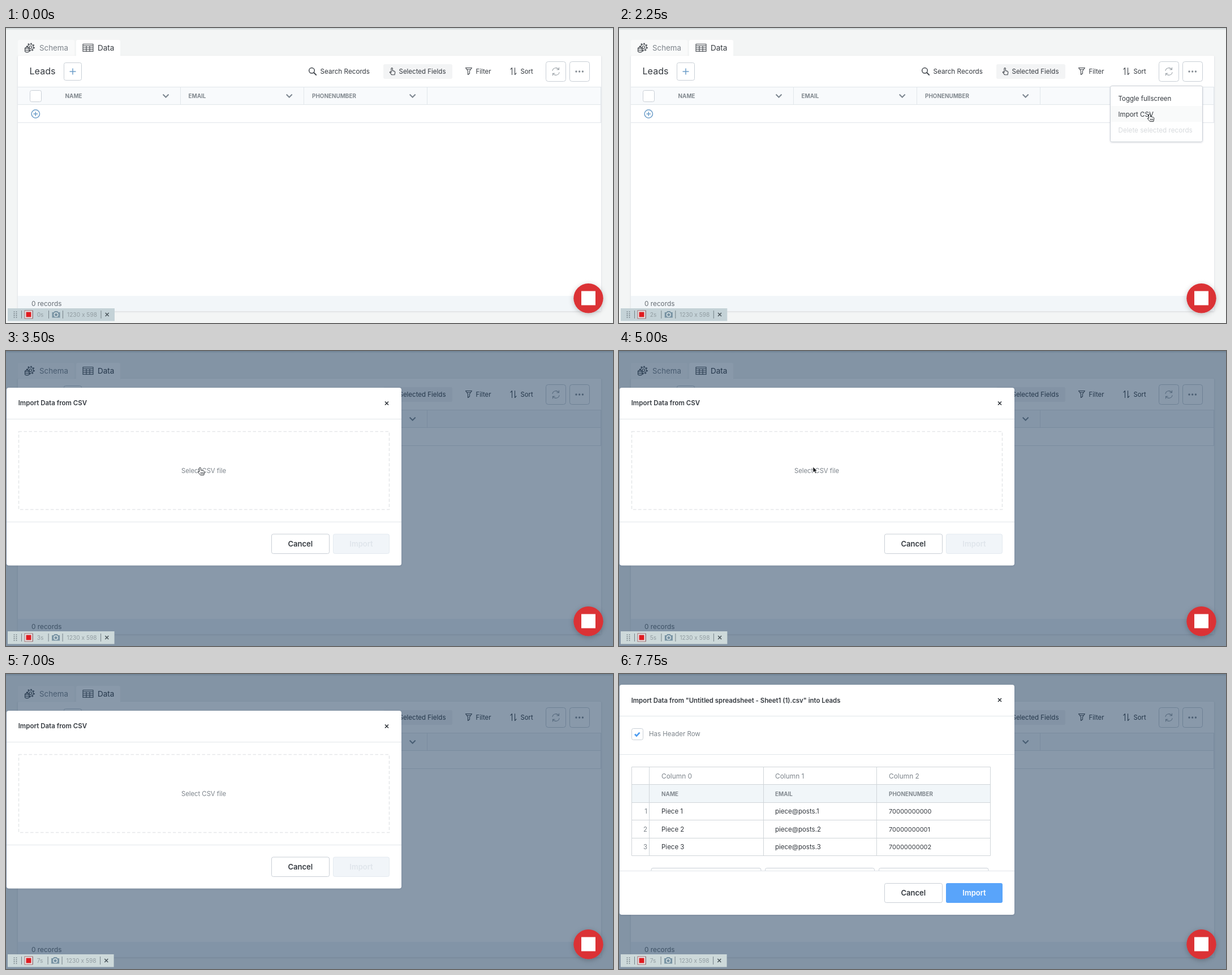
An HTML page that plays this animation: 1073 px wide and 522 px high, repeating every 8 s.

```html
<!DOCTYPE html>
<html lang="en">
<head>
<meta charset="utf-8">
<title>Import data</title>
<style>
html, body { margin: 0; width: 100%; height: 100%; overflow: hidden; background: #f3f5f5; }
svg { display: block; width: 1073px; height: 522px; font: 11.5px Inter, "Open Sans", sans-serif; }
text { fill: #34393f; white-space: pre; }
.line { fill: none; stroke: #e1e6ea; }
.btn { fill: #fff; stroke: #c9cfd6; }
.icon { fill: none; stroke: #41464c; stroke-width: 1.1; stroke-linecap: round; stroke-linejoin: round; }
.chev { fill: none; stroke: #7d8791; stroke-width: 2; }
.blue { fill: none; stroke: #6d9ec9; stroke-width: 1.5; }
.head { font-size: 9.9px; font-weight: 700; fill: #82898f; }
.soft { fill: #7d848b; }
.bold { font-weight: 600; }
.big { font-size: 13px; font-weight: 600; text-anchor: middle; }
.grid { fill: none; stroke: #d0d5d9; }
.rec { font-size: 10.2px; fill: #929da2; }
.sep { stroke: #768288; }
</style>
</head>
<body>
<svg viewBox="0 0 1073 522" xmlns="http://www.w3.org/2000/svg">
  <defs>
    <linearGradient id="top" x2="0" y2="1">
      <stop offset="0" stop-color="#cbd3d5"/><stop offset="1" stop-color="#f3f5f5"/>
    </linearGradient>
    <filter id="shade" x="-10%" y="-10%" width="120%" height="125%">
      <feDropShadow dx="0" dy="1" stdDeviation="1.5" flood-color="#27343d" flood-opacity=".14"/>
    </filter>
    <filter id="glow" x="-40%" y="-40%" width="180%" height="180%">
      <feDropShadow dx="0" dy="2" stdDeviation="5" flood-color="#000" flood-opacity=".24"/>
    </filter>
    <clipPath id="body"><path d="M1 143H699V348H1z"/></clipPath>
  </defs>

  <rect width="1073" height="522" fill="#f3f5f5"/>
  <rect width="1073" height="4" fill="url(#top)"/>

  <!-- tabs -->
  <path d="M21 49V24q0-3 3-3H118q3 0 3 3V49z" fill="#f9fafa"/>
  <rect x="21" y="49" width="1031" height="452" rx="2" fill="#fff" filter="url(#shade)"/>
  <path d="M124 50V24q0-3 3-3H199q3 0 3 3V50z" fill="#fff"/>
  <g class="icon" stroke="#73797e">
    <circle cx="43.3" cy="34" r="5.2"/>
    <circle cx="43.3" cy="34" r="6.6" stroke-width="1.8" stroke-dasharray="2.3 2.88" stroke-linecap="butt"/>
    <circle cx="43.3" cy="34" r="2.3"/>
    <path d="M33.5 35.5v6q3.5 2.8 7.5 0v-6q-3.7-2.7-7.5 0q3.5 2.6 7.5 0M33.5 38.5q3.5 2.6 7.5 0" fill="#f9fafa"/>
    <path d="M136 28.5h18v13h-18zM136 31.5h18M136 35h18M136 38.2h18M142 31.5v10M148 31.5v10"/>
  </g>
  <text x="59" y="39.5" font-size="13.3" class="soft">Schema</text>
  <text x="162" y="39.5" font-size="13.5">Data</text>

  <!-- toolbar -->
  <text x="41.5" y="82" font-size="16.1">Leads</text>
  <rect class="btn" x="102.5" y="61.5" width="31" height="31" rx="3"/>
  <path d="M112.5 77h11M118 71.5v11" class="blue" stroke-width="2"/>
  <g class="icon">
    <circle cx="540.5" cy="75.3" r="4.8" stroke-width="1.5"/><path d="M544.2 79l4 4" stroke-width="1.8"/>
  </g>
  <text x="555.5" y="80.5" font-size="11.7">Search Records</text>
  <rect x="667" y="64" width="122" height="26" rx="3" fill="#f3f4f5"/>
  <path class="icon" d="M681 78.500v-7.200q1.200-1.600 2.300 0v4.300l3.200.8q1.500.6 1.300 2.200l-.8 4.200h-5.200l-3.600-4.600q.8-1.300 2.800.3z"/>
  <text x="694.5" y="80.5">Selected Fields</text>
  <path class="icon" d="M812.500 70.500h11l-4 5.500v4.500l-3 2v-6.500zM814.500 73.200h7"/>
  <text x="830.500" y="80.5" font-size="11.4">Filter</text>
  <path class="icon" d="M894.500 82.500v-12l-2.600 2.600M899.500 70.500v12l2.600-2.600"/>
  <text x="909.500" y="80.5" font-size="11.3">Sort</text>
  <rect class="btn" x="954.5" y="59.5" width="35" height="35" rx="4"/>
  <rect class="btn" x="996.5" y="59.5" width="35" height="35" rx="4"/>
  <path class="icon" style="stroke:#9ba2a8" d="M966 75.500a6 6 0 0 1 11-2M978 78.500a6 6 0 0 1-11 2M977.500 70v3.700h-3.700M966.500 84v-3.700h3.700"/>
  <g fill="#868d94"><circle cx="1008" cy="77" r="1.700"/><circle cx="1013.700" cy="77" r="1.700"/><circle cx="1019.400" cy="77" r="1.700"/></g>

  <!-- grid -->
  <rect x="21" y="104" width="1031" height="32" fill="#f8fafc"/>
  <path class="line" d="M21 104.500H1052M21 135.500H1052M21 167.500H1052M308.500 104V136M526.500 104V136M744.500 104V136M1051.500 104V168"/>
  <rect class="btn" x="42.500" y="110.500" width="20" height="20" rx="3"/>
  <text class="head" x="104.500" y="124">NAME</text>
  <text class="head" x="322.500" y="124">EMAIL</text>
  <text class="head" x="541" y="124">PHONENUMBER</text>
  <path class="chev" d="M277.500 117.500l5 5l5-5M495.700 117.500l5 5l5-5M713.700 117.500l5 5l5-5"/>
  <g class="blue"><circle cx="52.300" cy="152" r="7.200"/><path d="M48.500 152h7.600M52.300 148.200v7.600"/></g>
  <rect x="21" y="474" width="1031" height="27" fill="#f2f6f9"/>
  <text x="45" y="491.700" font-size="11.800" fill="#5f666d" style="fill:#666d74">0 records</text>

  <g id="menu">
    <rect class="btn" x="868.500" y="102.500" width="163" height="99" rx="3" filter="url(#shade)"/>
    <rect id="hover" x="869" y="138" width="162" height="28" fill="#f9fafa"/>
    <text x="882.500" y="128.500">Toggle fullscreen</text>
    <text x="882.500" y="156.500">Import CSV</text>
    <text x="882.500" y="184.500" font-size="11.700" style="fill:#d7dadd">Delete selected records</text>
  </g>

  <rect id="veil" width="1073" height="522" fill="#153557" opacity=".5"/>

  <g id="pick">
    <rect x="1" y="65" width="698" height="314.500" rx="4" fill="#fff" filter="url(#shade)"/>
    <text class="bold" x="21.700" y="96">Import Data from CSV</text>
    <path d="M670 89.500l6 6m0-6l-6 6" stroke="#2b3036" stroke-width="1.500"/>
    <path class="line" d="M1 120.500H699M1 302.500H699"/>
    <rect x="22.500" y="142.500" width="655" height="138" fill="none" stroke="#e5e7e9" stroke-width="1.600" stroke-dasharray="5.500 3.500"/>
    <text class="soft" x="349.500" y="215.700" font-size="11.300" text-anchor="middle">Select CSV file</text>
    <rect class="btn" x="469.500" y="324" width="102" height="34.500" rx="3"/>
    <text class="big" x="520.300" y="346">Cancel</text>
    <rect x="578.500" y="324" width="99" height="34.500" rx="3" fill="#f1f5f9" stroke="#e4eaf0"/>
    <text class="big" x="628" y="346" style="fill:#dfe5eb">Import</text>
  </g>

  <g id="load">
    <rect x="1" y="19" width="698" height="407" rx="4" fill="#fff" filter="url(#shade)"/>
    <text class="bold" x="21.700" y="50.500" font-size="11.400">Import Data from "Untitled spreadsheet - Sheet1 (1).csv" into Leads</text>
    <path d="M670 43l6 6m0-6l-6 6" stroke="#2b3036" stroke-width="1.500"/>
    <path class="line" d="M1 74.500H699M1 142.500H699M1 348.500H699"/>
    <rect class="btn" x="22.500" y="96.500" width="20" height="20" rx="3"/>
    <path d="M28 106.500l3 3.200l5.500-6" fill="none" stroke="#4b9bf0" stroke-width="2.600"/>
    <text class="soft" x="53" y="110">Has Header Row</text>
    <rect x="22" y="196" width="635" height="31" fill="#f1f6f9"/>
    <path class="grid" d="M22.500 164.500H656.500V321.500H22.500zM22 195.500H657M22 227.500H657M22 258.500H657M22 290.500H657M53.500 164V322M255.500 164V322M455.500 164V322"/>
    <g id="cells"></g>
    <g clip-path="url(#body)">
      <rect class="btn" x="57" y="343.500" width="194" height="30" rx="3"/>
      <rect class="btn" x="258.500" y="343.500" width="193" height="30" rx="3"/>
      <rect class="btn" x="459.500" y="343.500" width="193.500" height="30" rx="3"/>
    </g>
    <rect class="btn" x="469.500" y="370.500" width="102" height="34" rx="3"/>
    <text class="big" x="520.300" y="391.500">Cancel</text>
    <rect x="578" y="370" width="100" height="35" rx="3" fill="#59a4fa"/>
    <text class="big" x="628" y="391.500" style="fill:#fff">Import</text>
  </g>

  <circle cx="1029.500" cy="478.300" r="26.200" fill="#db3035" filter="url(#glow)"/>
  <rect x="1017" y="465.500" width="25" height="25" fill="#fff"/>

  <!-- recorder bar -->
  <rect id="bar" x="3" y="496" width="189" height="22.500"/>
  <path d="M14.500 501.500v12M18.500 501.500v12" stroke="#6f7b81" stroke-width="1.600" stroke-dasharray="1.600 1.700"/>
  <path class="sep" d="M27.500 500v14M47.500 500v14"/>
  <rect x="33" y="500" width="14" height="14" fill="#e6eced" stroke="#a46d70"/>
  <rect x="35.500" y="502.500" width="9" height="9" fill="#e01b20"/>
  <text id="secs" class="rec" x="54.700" y="511"></text>
  <g id="tail">
    <path class="sep" d="M75.500 500v14M100.500 500v14M168 500v14"/>
    <path d="M81.500 503h3l1.500-2h5l1.500 2h3v9.500h-14z" fill="#7893a3"/>
    <circle cx="88.500" cy="507.300" r="3.300" fill="#7893a3" stroke="#dce5e7" stroke-width="1.400"/>
    <text class="rec" x="108" y="511">1230 x 598</text>
    <path d="M175.700 504l6 6m0-6l-6 6" stroke="#4a555b" stroke-width="1.500"/>
  </g>

  <path id="hand" d="M-1.500 8V1Q0-1 1.500 1V5.200L3 4.900L4.700 5.700L6.300 5.900Q8 6.500 7.900 8.300L6.800 13.500H.7L-3.800 8.200Q-3.700 6.500-1.500 8zM1.500 8.500v3M3.500 8.500v3M5.500 8.500v3" fill="#fff" stroke="#2b2f33" stroke-linejoin="round"/>
  <path id="arrow" d="M0 0V10L2.400 7.900L4 11.500L5.700 10.700L4.100 7.300H7.200z" fill="#17191c" stroke="#fff" stroke-width=".6"/>
</svg>
<script>
const LOOP = 8000;
const MENU = 1500, OPEN = 2500, LOADED = 7500;
// time, x, y, cursor shape
const steps = [
  [0, 0, 0, ""], [1000, 985, 138, "arrow"], [1250, 1013, 76, "hand"],
  [2000, 975, 122, "hand"], [2250, 938, 152, "hand"], [3000, 560, 190, "hand"],
  [3250, 372, 205, "hand"], [3500, 343, 206, "hand"], [4250, 343, 205, "arrow"],
  [6000, 0, 0, ""]
];
// the bar narrows a little with the digit shown
const shift = [0, -3, -.7, -.4, 0, -.6, -.4, -1.4];
const $ = id => document.getElementById(id);
const show = (id, on) => $(id).style.display = on ? "" : "none";

function cell(x, y, str, cls = "", anchor = "start", size = 11.5) {
  const t = document.createElementNS("http://www.w3.org/2000/svg", "text");
  const attrs = { x, y, class: cls, "text-anchor": anchor, "font-size": size };
  for (const k in attrs) t.setAttribute(k, attrs[k]);
  t.textContent = str;
  $("cells").append(t);
}

[75, 276, 477].forEach((x, c) => {
  cell(x, 184.5, "Column " + c, "soft", "start", 11.9);
  cell(x, 216, ["NAME", "EMAIL", "PHONENUMBER"][c], "head", "start", 9.9);
});
for (let n = 1; n < 4; n++) {
  const y = 216 + n * 31.3;
  cell(50, y, n, "soft", "end");
  cell(75, y, "Piece " + n);
  cell(276, y, "piece@posts." + n);
  cell(477, y, 70000000000 + n - 1, "", "start", 11);
}

function draw(t) {
  const [, x, y, shape] = steps.filter(s => s[0] <= t).pop();
  for (const id of ["hand", "arrow"]) {
    show(id, id === shape);
    $(id).setAttribute("transform", `translate(${x} ${y})`);
  }
  show("menu", t >= MENU && t < OPEN);
  $("hover").setAttribute("y", y < 138 ? 110 : 138);
  show("hover", y > 110);
  show("veil", t >= OPEN);
  show("pick", t >= OPEN && t < LOADED);
  show("load", t >= LOADED);

  const sec = Math.floor(t / 1000);
  $("secs").textContent = sec + "s";
  $("tail").setAttribute("transform", `translate(${shift[sec]} 0)`);
  $("bar").setAttribute("width", 189 + shift[sec]);
  $("bar").setAttribute("fill", t < OPEN ? "#c4d2d7" : "#cdd9da");
}

function tick() {
  draw(performance.now() % LOOP);
  requestAnimationFrame(tick);
}
tick();
</script>
</body>
</html>
```
